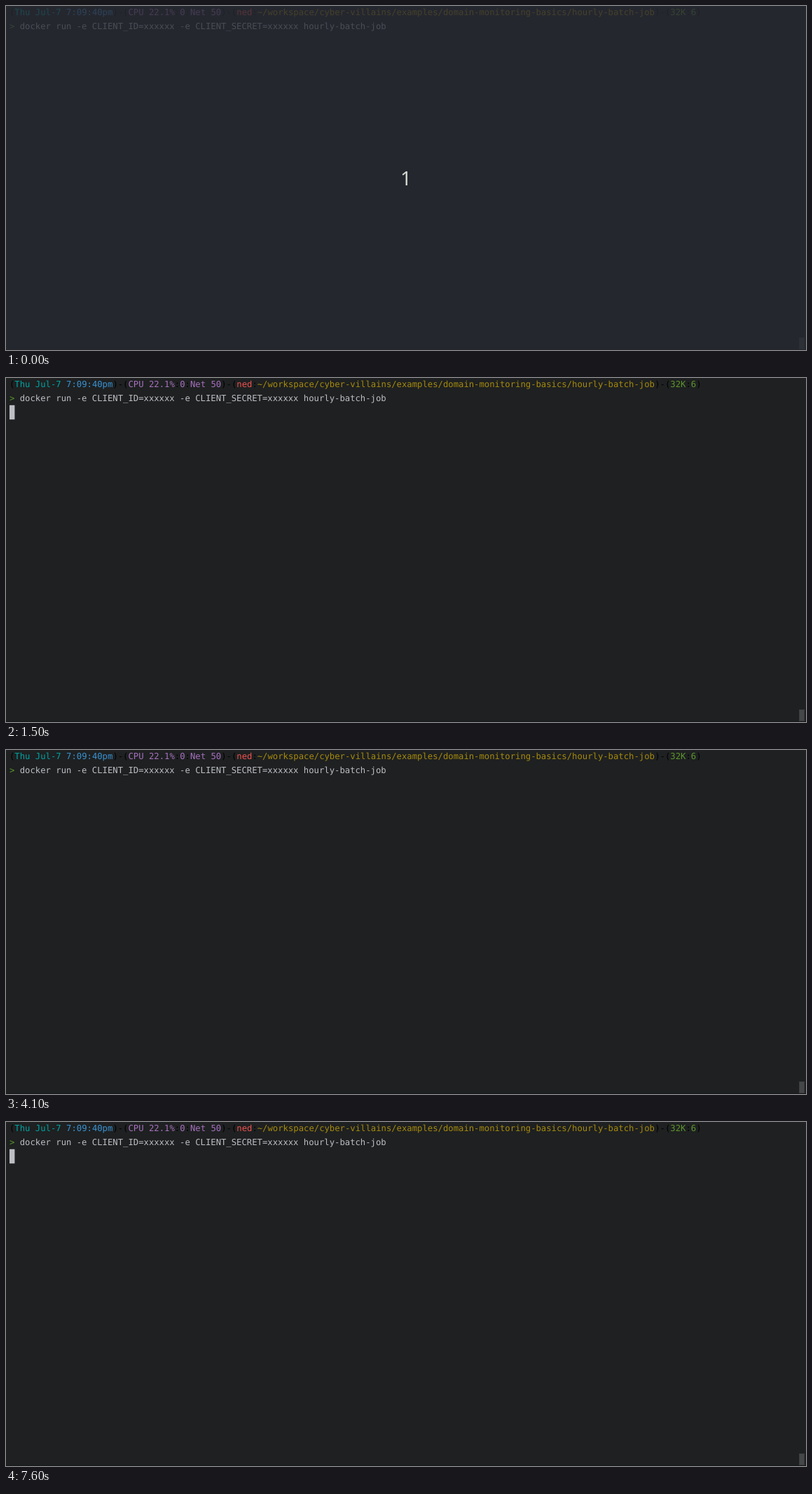
An HTML page that plays this animation: 1142 px wide and 491 px high, repeating every 8 s.

```html
<!DOCTYPE html>
<html lang="en">
<head>
<meta charset="utf-8">
<title>Terminal</title>
<style>
html, body { margin: 0; width: 100%; height: 100%; overflow: hidden; background: #1e2021; }
svg { display: block; }
.term { font: 12.24px "DejaVu Sans Mono", monospace; text-rendering: geometricPrecision; }
.count { font: 28px "Noto Sans", sans-serif; fill: #d3d7cf; text-anchor: middle; }
</style>
</head>
<body>
<svg id="stage" width="1142" height="491" viewBox="0 0 1142 491">
  <rect width="1142" height="491" fill="#1e2021"/>
  <g id="lines" class="term"></g>
  <rect x="1132.5" y="473.5" width="7" height="16" fill="#464748" stroke="#3a3b3c"/>
  <rect y="490" width="1142" height="1" fill="#17181a"/>
  <rect id="cursor" width="7.4" height="20.4" fill="#bcbec4"/>
  <g id="countdown">
    <rect width="1142" height="491" fill="#272a33" opacity="0.77"/>
    <text class="count" x="571" y="256">1</text>
  </g>
</svg>
<script>
const NS = "http://www.w3.org/2000/svg";
const LOOP = 8000, LEFT = 5, CELL = 7.37;
const $ = id => document.getElementById(id);
const color = {
  black: "#000000", cyan: "#00a3a3", blue: "#3993d4", magenta: "#a771bf",
  red: "#f0524f", yellow: "#a68a0d", green: "#5c962c", plain: "#bcbec4"
};

// Each run is [text, color]; its x follows from the column it starts in.
function addLine(y, runs) {
  let col = 0;
  for (const [text, name] of runs) {
    const el = document.createElementNS(NS, "text");
    el.setAttribute("x", LEFT + col * CELL);
    el.setAttribute("y", y);
    el.setAttribute("fill", color[name]);
    el.textContent = text;
    $("lines").append(el);
    col += text.length;
  }
  return LEFT + col * CELL;
}

addLine(13, [
  ["(", "black"], ["Thu Jul-7 ", "cyan"], ["7:09:40pm", "blue"], [")-(", "black"],
  ["CPU 22.1%", "magenta"], [":", "black"], ["0", "magenta"], [":", "black"],
  ["Net 50", "magenta"], [")-(", "black"], ["ned", "red"], [":", "black"],
  ["~/workspace/cyber-villains/examples/domain-monitoring-basics/hourly-batch-job", "yellow"],
  [")-(", "black"], ["32K", "green"], [":", "black"], ["6", "green"], [")", "black"]
]);
const commandEnd = addLine(33, [
  ["> ", "green"],
  ["docker run -e CLIENT_ID=xxxxxx -e CLIENT_SECRET=xxxxxx hourly-batch-job", "plain"]
]);

// The blink settles into a steady second after two uneven beats.
function cursorOn(t) {
  if (t < 200) return false;
  if (t < 1000) return true;
  if (t < 1500) return false;
  if (t < 2200) return true;
  if (t < 2600) return false;
  return (t - 2600) % 1000 < 500;
}

function draw(t) {
  const typed = t < 400;
  $("countdown").style.display = t < 100 ? "" : "none";
  $("cursor").style.display = cursorOn(t) ? "" : "none";
  $("cursor").setAttribute("x", typed ? commandEnd : LEFT);
  $("cursor").setAttribute("y", typed ? 18.4 : 38.8);
}

const start = performance.now();
function tick() {
  draw((performance.now() - start) % LOOP);
  requestAnimationFrame(tick);
}
draw(0);
requestAnimationFrame(tick);
</script>
</body>
</html>
```
